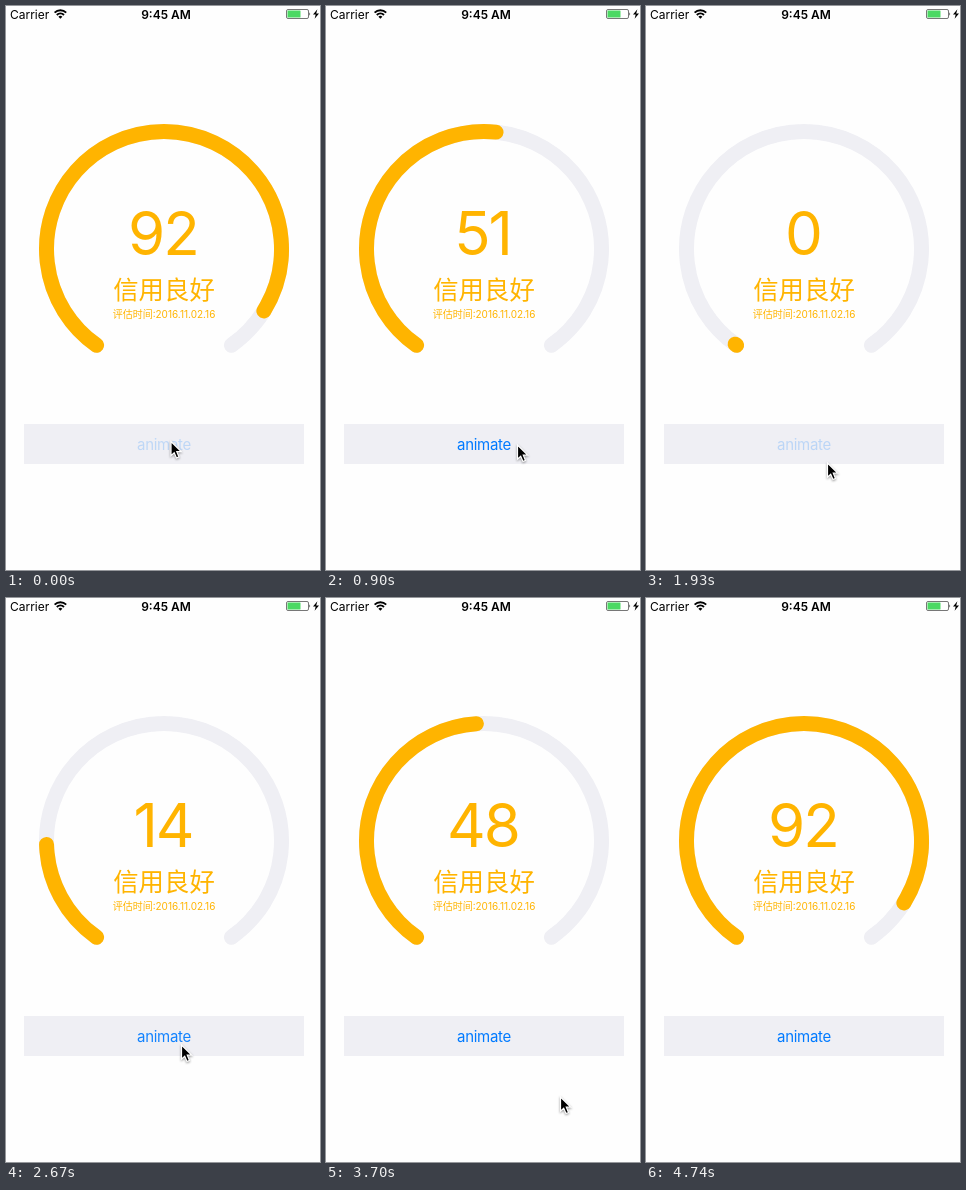
Write an HTML page that moves like this. It is 314 px wide and 564 px high and loops after 5.48 s.

```html
<!DOCTYPE html>
<html lang="zh">
<head>
<meta charset="utf-8">
<title>Credit gauge</title>
<style>
  html, body { margin: 0; width: 100%; height: 100%; overflow: hidden; background: #fefefe; }
  svg { display: block; width: 314px; height: 564px; font-family: Inter, "Noto Sans CJK SC", "Noto Sans CJK", sans-serif; }
  .gauge { fill: none; stroke-width: 15; stroke-linecap: round; }
  .label { fill: #ffb400; text-anchor: middle; }
</style>
</head>
<body>
<svg viewBox="0 0 314 564">
  <text x="4" y="12.6" font-size="12">Carrier</text>
  <g fill="none" stroke="#000" stroke-width="1.9">
    <path d="M48.6 6.7a8.2 8.2 0 0 1 11.6 0M50.8 9a5.1 5.1 0 0 1 7.2 0"/>
    <path d="M52.4 10.7a2.9 2.9 0 0 1 4 0L54.4 12.8z" fill="#000" stroke="none"/>
  </g>
  <text x="160" y="12.6" font-size="12" font-weight="600" text-anchor="middle">9:45 AM</text>
  <rect x="280.5" y="3.5" width="22" height="9" rx="1.5" fill="none" stroke="#555" stroke-width=".8"/>
  <rect x="281.5" y="4.5" width="13" height="7" rx=".5" fill="#4cd964"/>
  <path d="M303.4 6.2q1.6 1.8 0 3.6z" fill="#333"/>
  <path d="M311.4 3.2L307 8.6h2.7L308.6 12.8 313 7.4h-2.8z"/>

  <path class="gauge" stroke="#efeff4" d="M90.6 339.25A117.5 117.5 0 1 1 225.4 339.25"/>
  <path class="gauge" id="arc" stroke="#ffb400" pathLength="100" d="M90.6 339.25A117.5 117.5 0 1 1 225.4 339.25"/>
  <text class="label" id="score" x="157" y="249" font-size="60" letter-spacing="-2"></text>
  <text class="label" x="158" y="292.5" font-size="25.4">信用良好</text>
  <text class="label" x="158" y="311.6" font-size="10">评估时间:2016.11.02.16</text>

  <path fill="#efeff4" d="M18 418h280v40H18z"/>
  <text id="button" x="158" y="443.6" font-size="15" letter-spacing="-.3" text-anchor="middle" fill="#007aff">animate</text>
  <path id="cursor" d="M0 0V14.2L3.2 11.2 5.5 16.5 8 15.4 5.8 10.2H10.2Z" stroke="#fff" stroke-width="1.2"
        style="filter: drop-shadow(0 1px 1px #0006)"/>
</svg>
<script>
const LOOP = 5480, STEPS = 32, FULL = 0.92, RATE = 0.636;
const runs = [-2000, 82, 1925, 2381, 2934]; // moments the button is released
const track = [ // cursor: time, x, y
  [0, 165, 435.5], [150, 165, 435.5], [900, 191.5, 439], [1190, 198, 481], [1340, 196, 484],
  [1930, 181.5, 457], [2380, 175.5, 447], [3560, 175.5, 447], [3700, 234.5, 499],
  [3850, 258, 545], [4000, 268, 572]
];
const $ = id => document.getElementById(id);
const clamp = (v, lo, hi) => Math.min(hi, Math.max(lo, v));

const shortTicks = [7, 13, 18, 22, 25, 29];
const ticks = [0];
for (let i = 1; i <= STEPS; i++) ticks.push(ticks[i - 1] + (shortTicks.includes(i) ? 140 : 150));

function cursorAt(t) {
  const i = track.findIndex(key => key[0] > t);
  if (i < 0) return track.at(-1).slice(1);
  const [a, b] = [track[i - 1], track[i]];
  const k = (t - a[0]) / (b[0] - a[0]);
  return [1, 2].map(n => a[n] + (b[n] - a[n]) * k);
}

function draw(t) {
  const since = t - runs.findLast(start => start <= t);
  const progress = clamp(since / 1000 * RATE, 0.0005, FULL);
  const pressed = runs.some(start => t < start && t > start - 120);
  $("arc").setAttribute("stroke-dasharray", `${progress * 100} 200`);
  $("score").textContent = Math.floor(clamp(progress * 112 - 6.4, 0, FULL * 100));
  $("button").setAttribute("opacity", pressed ? 0.2 : clamp(0.2 + 0.8 * since / 320, 0.2, 1));
  $("cursor").setAttribute("transform", `translate(${cursorAt(t)})`);
}

const origin = performance.now();
function frame() {
  const t = (performance.now() - origin) % LOOP;
  draw(ticks.findLast(tick => tick <= t));
  requestAnimationFrame(frame);
}
frame();
</script>
</body>
</html>
```
